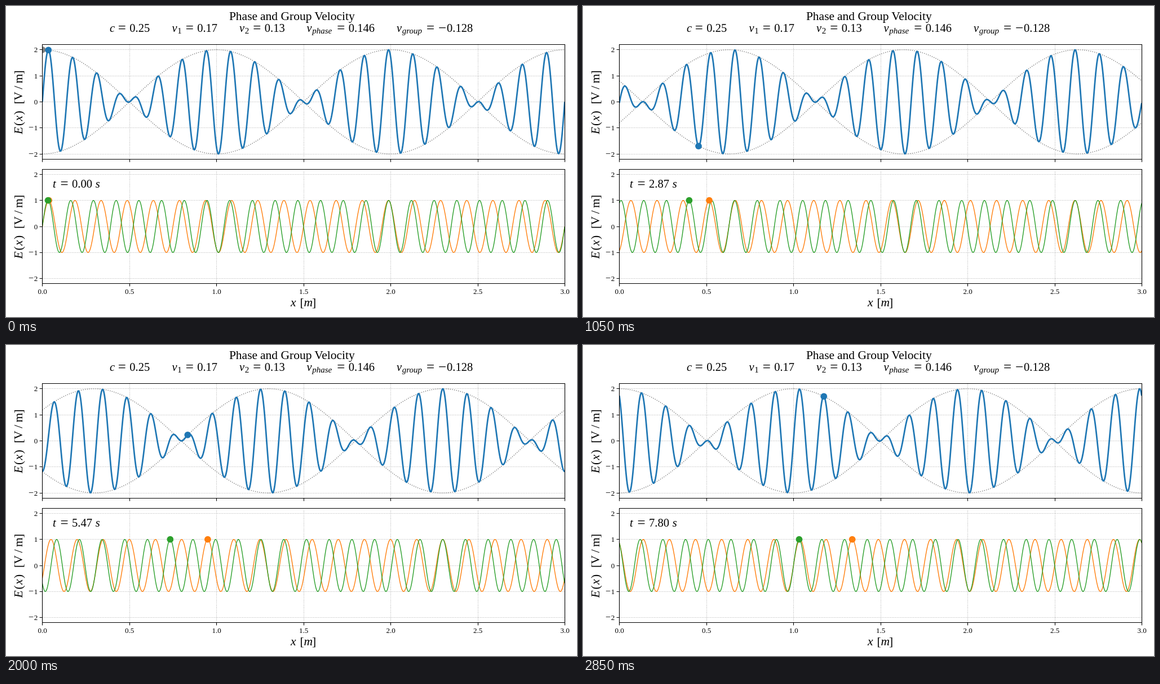
These frames come from a looping animation (1013 px wide and 553 px high, 2.9 s). An HTML page:

```html
<!DOCTYPE html>
<html lang="en">
<head>
<meta charset="utf-8">
<title>Phase and Group Velocity</title>
<style>
html, body { margin: 0; width: 100%; height: 100%; overflow: hidden; background: #fff; }
svg { display: block; width: 1013px; height: 553px; }
text { font-family: "Liberation Serif", "Times New Roman", serif; font-size: 20.5px; white-space: pre; }
path { fill: none; }
.it { font-style: italic; }
.sub { font-size: 15px; }
.tick { font-size: 13px; }
.sign { font-size: 25px; text-anchor: middle; }
.tick.sign { font-size: 16px; }
.mid { text-anchor: middle; }
.end { text-anchor: end; }
.title { font-size: 21.5px; }
.label { font-size: 21.5px; }
.axis { stroke: #000; stroke-width: 1.1; }
.grid { stroke: #b0b0b0; stroke-width: 1.1; stroke-dasharray: 1.1 1.83; }
.env { stroke: #808080; stroke-width: 1.4; stroke-dasharray: 1.4 2.29; }
.wave { stroke-linejoin: round; }
</style>
</head>
<body>
<svg viewBox="0 0 1013 553">
  <defs>
    <clipPath id="topBox"><rect x="64.5" y="68.5" width="927" height="204"/></clipPath>
    <clipPath id="lowBox"><rect x="64.5" y="290.5" width="927" height="203"/></clipPath>
  </defs>
</svg>
<script>
const STEP = 50, FRAMES = 58, T_END = 7.8;
const TAU = 2 * Math.PI, C = 0.25;
const BLUE = '#1f77b4', ORANGE = '#ff7f0e', GREEN = '#2ca02c', GRAY = '#808080';
const TOP = 170.4, LOW = 392;
const LEFT = 64.5, RIGHT = 991.5;

// Two plane waves in media with refractive indices 1.5 and 1.95
const wave1 = { k: TAU * 20 / 3, v: C / 1.5 };
const wave2 = { k: TAU * 23 / 3, v: C / 1.95 };
const w1 = wave1.k * wave1.v, w2 = wave2.k * wave2.v;
const kSum = wave1.k + wave2.k;
const vPhase = (w1 + w2) / kSum;
const vGroup = (w1 - w2) / (wave1.k - wave2.k);

const px = x => LEFT + 308.9 * x;
const py = (mid, y) => mid - 46.3 * y;
const snap = v => Math.floor(v) + 0.5;

const svg = document.querySelector('svg');

function add(tag, attrs, parent = svg) {
  const el = document.createElementNS('http://www.w3.org/2000/svg', tag);
  for (const name in attrs) el.setAttribute(name, attrs[name]);
  parent.appendChild(el);
  return el;
}

function write(str, x, y, cls = '', parent = svg) {
  const el = add('text', { x, y, class: cls }, parent);
  el.textContent = str;
  return el;
}

const sign = (ch, x, y) => write(ch, x, y + 1.3, 'sign');

function drawGrid(mid, top, bottom) {
  let d = '';
  for (let i = 0; i <= 6; i++) d += `M${snap(LEFT + 154.5 * i)} ${bottom}V${top}`;
  for (let n = -2; n <= 2; n++) d += `M${LEFT} ${snap(py(mid, n))}H${RIGHT}`;
  add('path', { d, class: 'grid' });
}

function drawFrame(mid, top, bottom) {
  let d = `M${LEFT} ${top}H${RIGHT}V${bottom}H${LEFT}Z`;
  for (let i = 0; i <= 6; i++) d += `M${snap(LEFT + 154.5 * i)} ${bottom}v4.9`;
  for (let n = -2; n <= 2; n++) {
    const y = snap(py(mid, n));
    d += `M${LEFT} ${y}h-4.9`;
    write(Math.abs(n), 56.2, y + 4.3, 'tick end');
    if (n < 0) write('−', 44.5, y + 4.5, 'tick sign');
  }
  add('path', { d, class: 'axis' });
}

function yLabel(y) {
  const g = add('g', { transform: `translate(29.3 ${y}) rotate(-90)` });
  const parts = [['E', 0, 'it'], ['(', 15], ['x', 23.5, 'it'], [')', 34.5],
    ['[', 53.5], ['V', 60], ['/', 80], ['m', 90.5], [']', 106.5]];
  for (const [s, x, cls = ''] of parts) write(s, x, 0, 'label ' + cls, g);
}

function equation(name, sub, x, value, valueX, negative) {
  const y = 46;
  write(name, x, y, 'it');
  if (sub) write(sub, x + 9.7, y + 3, /\d/.test(sub) ? 'sub' : 'sub it');
  sign('=', valueX - (negative ? 29 : 13.5), y);
  if (negative) sign('−', valueX - 8, y);
  write(value, valueX, y);
}

// Headings
[['Phase', 421], ['and', 466.5], ['Group', 515], ['Velocity', 583]]
  .forEach(([s, x]) => write(s, x, 25, 'title mid'));
equation('c', '', 184, '0.25', 219.3);
equation('v', '1', 294.5, '0.17', 339.2);
equation('v', '2', 414, '0.13', 458.8);
equation('v', 'phase', 533.5, '0.146', 607.8);
equation('v', 'group', 693, '0.128', 782, true);

// Plots
drawGrid(TOP, 68.5, 272.5);
drawGrid(LOW, 290.5, 493.5);
const topBox = add('g', { 'clip-path': 'url(#topBox)' });
const lowBox = add('g', { 'clip-path': 'url(#lowBox)' });
const curve = (stroke, width, box) =>
  add('path', { class: 'wave', stroke, 'stroke-width': width }, box);
const dot = (fill, box) => add('circle', { r: 5.9, fill }, box);

const envUp = add('path', { class: 'env' }, topBox);
const envDown = add('path', { class: 'env' }, topBox);
const groupDot = dot(GRAY, topBox);
const sumLine = curve(BLUE, 2.7, topBox);
const sumDot = dot(BLUE, topBox);
const line1 = curve(ORANGE, 1.4, lowBox);
const line2 = curve(GREEN, 1.4, lowBox);
const dot1 = dot(ORANGE, lowBox);
const dot2 = dot(GREEN, lowBox);

drawFrame(TOP, 68.5, 272.5);
drawFrame(LOW, 290.5, 493.5);
for (let i = 0; i <= 6; i++) write((i / 2).toFixed(1), LEFT + 154.5 * i, 511.5, 'tick mid');
yLabel(228);
yLabel(449.5);
write('x', 505, 534, 'label it');
write('[', 521.5, 534, 'label');
write('m', 528.5, 534, 'label it');
write(']', 543, 534, 'label');

write('t', 83, 323, 'it');
sign('=', 103.6, 323);
const clock = write('', 117, 323);
write('s', 158.8, 323, 'it');

function plot(path, mid, f) {
  let d = '';
  for (let i = 0; i <= 1000; i++) {
    const x = 3 * i / 1000;
    d += `${i ? 'L' : 'M'}${px(x).toFixed(2)} ${py(mid, f(x)).toFixed(2)}`;
  }
  path.setAttribute('d', d);
}

function place(el, mid, x, y) {
  el.setAttribute('cx', px(x));
  el.setAttribute('cy', py(mid, y));
}

function render(ms) {
  const frame = Math.floor(ms / STEP) % FRAMES;
  const t = T_END * frame / (FRAMES - 1);
  const e1 = x => Math.sin(wave1.k * x - w1 * t);
  const e2 = x => Math.sin(wave2.k * x - w2 * t);
  const sum = x => e1(x) + e2(x);
  const env = x => 2 * Math.cos(Math.PI * (x - vGroup * t));

  plot(envUp, TOP, env);
  plot(envDown, TOP, x => -env(x));
  plot(sumLine, TOP, sum);
  plot(line1, LOW, e1);
  plot(line2, LOW, e2);

  const crest = Math.PI / kSum + vPhase * t;
  place(groupDot, TOP, vGroup * t, 2);
  place(sumDot, TOP, crest, sum(crest));
  place(dot1, LOW, TAU / 4 / wave1.k + wave1.v * t, 1);
  place(dot2, LOW, TAU / 4 / wave2.k + wave2.v * t, 1);
  clock.textContent = t.toFixed(2);
}

function tick() {
  render(performance.now());
  requestAnimationFrame(tick);
}
render(0);
requestAnimationFrame(tick);
</script>
</body>
</html>
```
